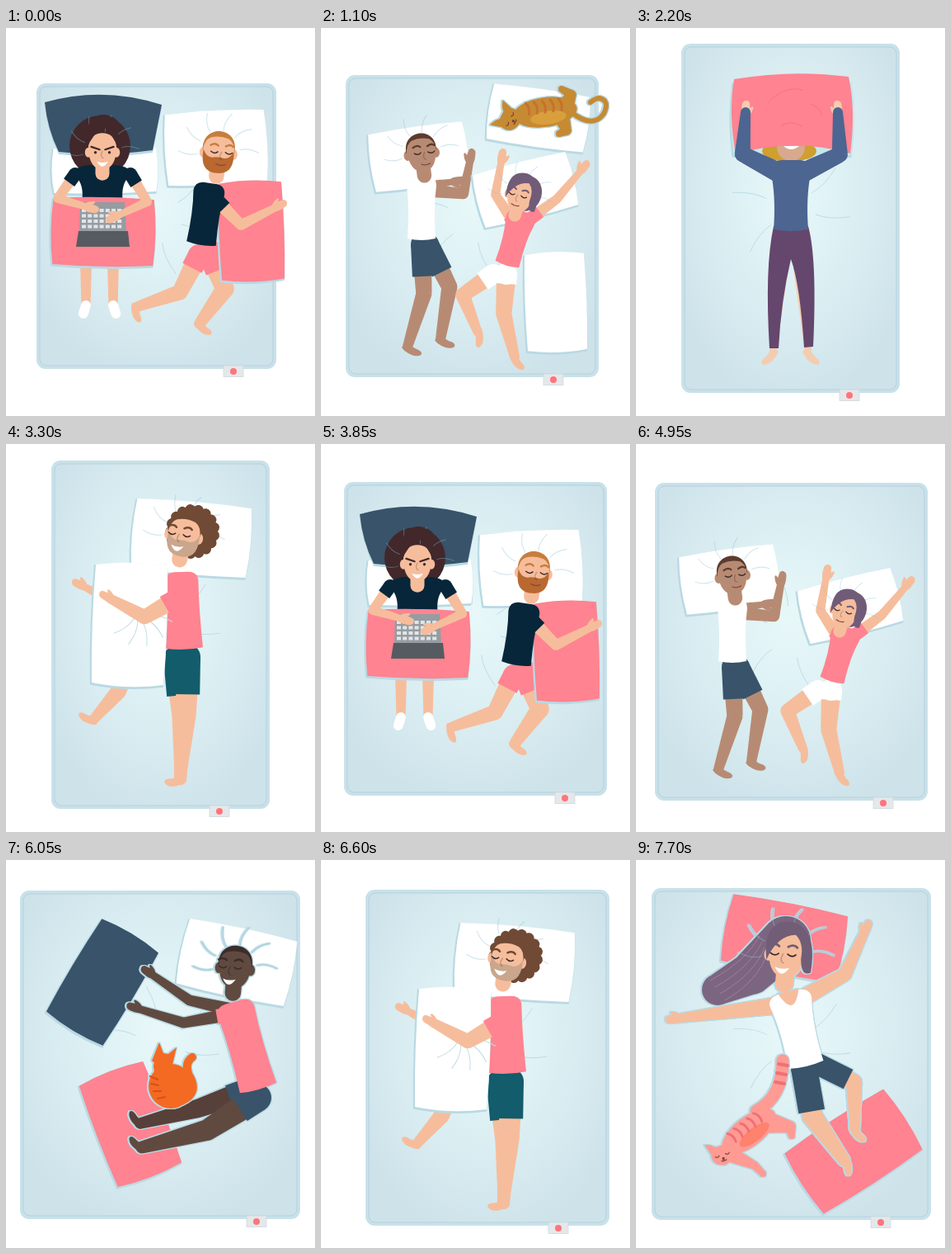
Write an HTML page that moves like this. It is 375 px wide and 470 px high and loops after 8250 ms.

```html
<!DOCTYPE html>
<html lang="en">
<head>
<meta charset="utf-8">
<title>Sleeping habits</title>
<style>
html, body { margin: 0; width: 100%; height: 100%; overflow: hidden; background: #fff; }
svg { display: block; width: 375px; height: 470px; }
.halo { filter: drop-shadow(1.5px 0 #b9d9e3) drop-shadow(-1.5px 0 #b9d9e3) drop-shadow(0 1.5px #b9d9e3) drop-shadow(0 -1px #b9d9e3); }
</style>
</head>
<body>
<svg id="stage" viewBox="0 0 375 470"></svg>
<script>
const PINK = '#ff8390', NAVY = '#38536a', DARK = '#07263a', WHITE = '#fff', SHADE = '#b9d9e3',
      FAIR = '#f6bd9c', PALE = '#f3cdb0', TAN = '#b78b73', BROWN = '#8a6650', DEEP = '#604a40';
const STEP = 550;

// Drawing primitives
const shape = (c, d) => `<path d="${d}" fill="${c}"/>`;
const line = (c, w, d, cap = 'round') => `<path d="${d}" fill="none" stroke="${c}" stroke-width="${w}" stroke-linecap="${cap}" stroke-linejoin="round"/>`;
const disc = (c, x, y, rx, ry = rx) => `<ellipse cx="${x}" cy="${y}" rx="${rx}" ry="${ry}" fill="${c}"/>`;
const put = (x, y, rot, s, body) => `<g transform="translate(${x} ${y}) rotate(${rot}) scale(${s})">${body}</g>`;
const halo = body => `<g class="halo">${body}</g>`;
const repeat = (n, f) => Array.from({ length: n }, (_, i) => f(i)).join('');
const degrees = (dx, dy) => Math.atan2(dy, dx) * 180 / Math.PI;

// Chain of circles joined by tapering bars: x, y, radius for each
function limb(c, ...n) {
  let d = '';
  for (let i = 0; i < n.length; i += 3) {
    const [x, y, r, X, Y, R] = n.slice(i, i + 6);
    d += `M${x - r} ${y}a${r} ${r} 0 0 0 ${2 * r} 0a${r} ${r} 0 0 0 ${-2 * r} 0z`;
    if (R) {
      const l = Math.hypot(X - x, Y - y), u = (y - Y) / l, v = (X - x) / l;
      d += `M${x + u * r} ${y + v * r}L${X + u * R} ${Y + v * R} ${X - u * R} ${Y - v * R} ${x - u * r} ${y - v * r}z`;
    }
  }
  return shape(c, d);
}

// Two-part limb whose middle joint is pushed sideways by bend
function member(tip, skin, x, y, X, Y, bend, { r, turn = 0, cloth, cover = .35, end = skin }) {
  const l = Math.hypot(X - x, Y - y), at = .47,
        jx = x + (X - x) * at - (Y - y) / l * bend, jy = y + (Y - y) * at + (X - x) / l * bend;
  return put(X, Y, degrees(X - jx, Y - jy) + turn, `1 ${(turn || -bend) < 0 ? 1 : -1}`, shape(end, tip)) +
    limb(skin, x, y, r, jx, jy, r * .8, X, Y, r * .4 + 1.2) +
    (cloth ? disc(cloth, x, y, r + 1) + line(cloth, 2 * r + 2, `M${x} ${y}L${x + (jx - x) * cover} ${y + (jy - y) * cover}`, 'butt') : '');
}
const HAND = 'M-4-4Q0-8 6-9Q9-8 5-5L12-4Q15-2 14 1Q13 5 7 5Q0 6-4 4z';
const FOOT = 'M-5-5Q4-2 13-5Q19-6 19-2Q17 3 10 5Q2 7-5 5z';
const arm = (skin, x, y, X, Y, bend, o) => member(HAND, skin, x, y, X, Y, bend, { r: 8, ...o });
const leg = (skin, x, y, X, Y, bend, o) => member(FOOT, skin, x, y, X, Y, bend, { r: 12, ...o });

// Top from neck to waist; a and b are half widths at shoulder and hip
function torso(c, x, y, X, Y, a, b, neck) {
  const l = Math.hypot(X - x, Y - y);
  return put(x, y, degrees(X - x, Y - y) - 90, 1,
    shape(c, `M${-a * .45} 0Q${-a} 1 ${-a} 12Q${-b * .85} ${l / 2} ${-b} ${l}Q0 ${l + 4} ${b} ${l}Q${b * .85} ${l / 2} ${a} 12Q${a} 1 ${a * .45} 0z`) +
    (neck ? shape(neck, `M${-a * .5}-1Q0 ${a * 1.3} ${a * .5}-1z`) : ''));
}

function pillow(c, x, y, w, h, rot) {
  const a = w / 2, b = h / 2, d = `M${-a} ${-b}Q0 ${-b * 1.1} ${a} ${-b}Q${a * 1.08} 0 ${a} ${b}Q0 ${b * 1.1} ${-a} ${b}Q${-a * 1.08} 0 ${-a} ${-b}z`;
  return put(x - 1, y + 1.5, rot, 1, shape(SHADE, d) + line(SHADE, 2.5, d)) + put(x, y, rot, 1, shape(c, d));
}

const CAP = 'M-10.4 0C-13-18 13-18 10.4 0Q10-7 6-9Q0-11-6-9Q-10-7-10.4 0z';
const BOB = 'M-11 4Q-15-18 1-18Q16-16 14 9Q9 12 8 2Q9-7 4-11Q-6-10-11 4z';
const BEARD = 'M-10-1Q-8 4-4 4Q0 3 4 4Q8 4 10-1C11 9 8 14 0 14S-11 9-10-1z';
const GRIN = shape(WHITE, 'M-4 7.5Q0 9 4 7.5Q2 11 0 11T-4 7.5z');
const LIPS = line('#8a4a45', .8, 'M-3 8q3 1.5 6 0');
const ASLEEP = line('#3d2b2b', .8, 'M-7 0q2.5 2 4.5 0M2.5 0q2.5 2 4.5 0');
const AWAKE = disc('#3d2b2b', -5, 1, 1) + disc('#3d2b2b', 5, 1, 1);

function head(x, y, s, rot, skin, hair, { back = '', cut = CAP, beard, mouth = LIPS, eyes = ASLEEP, brows = 'M-7.5-4q3-2 5 0M2.5-4q3-2 5 0', look = 0 } = {}) {
  const crease = repeat(6, i => put(0, 0, i * 36 - 190, 1, line('#8cc3d666', .6, 'M14 0Q20-1 26 3')));
  return put(x, y, rot, s, crease + back + line(skin, 10, 'M0 8V16') + disc(skin, -10, 1, 2.5, 3.5) + disc(skin, 10, 1, 2.5, 3.5) +
    shape(skin, 'M-10-3C-10-16 10-16 10-3C10 8 6 13 0 13S-10 8-10-3z') + (beard ? shape(beard, BEARD) : '') + shape(hair, cut) +
    put(look, 0, 0, 1, line(hair, 1.3, brows) + eyes + line('#0003', .8, 'M0 0q-2 4 .5 5') + mouth));
}

const curls = (c, x, r) => disc(c, x, -3, r) + repeat(17, i => disc(c, x + r * Math.cos(i * .37), -3 + r * Math.sin(i * .37), 3.4));

function bed(x, y, w, h, tag) {
  const frame = (m, r, a) => `<rect x="${x + m}" y="${y + m}" width="${w - 2 * m}" height="${h - 2 * m}" rx="${r}" ${a}/>`;
  const folds = repeat(6, i => put(x + w / 2, y + h * .47, i * 62 + 15, 1, line('#bddce6', .9, 'M32 0Q50 2 72-8')));
  return frame(0, 11, 'fill="#c9e1e9"') + frame(4, 8, 'fill="url(#sheet)" stroke="#b3d2dd"') + folds +
    `<rect x="${tag}" y="${y + h - 4}" width="24" height="13.5" fill="#e4e8ea" stroke="#cfdade" stroke-width=".8"/>` +
    disc('#ff747d', tag + 12, y + h + 3, 4);
}

// Sleepers
function typist() {
  const hair = '#42282a', sleeve = { r: 7, cloth: DARK };
  const shin = x => limb(FAIR, x, 285, 7, x, 338, 5.5) + limb(WHITE, x, 336, 6, x + (x - 113) * .2, 346, 6);
  const keys = repeat(28, i => `M${92 + i % 7 * 7.2} ${219 + (i / 7 | 0) * 6.5}h5v4h-5z`);
  const cover = 'M47 90Q118 70 189 93L178 148Q118 156 64 150Q50 122 47 90z';
  return pillow(WHITE, 120, 172, 124, 54, -1) + put(0, 3, 0, 1, shape(SHADE, cover)) + shape(NAVY, cover) +
    limb(hair, 118, 129, 24, 114, 143, 37) + shin(97) + shin(130) +
    torso(DARK, 117, 166, 117, 212, 34, 25) +
    head(117, 149, 1.7, 0, FAIR, hair, { eyes: AWAKE, brows: 'M-8-3l6 2M8-3l-6 2', mouth: GRIN, cut: 'M-11-2Q-14-24 1-26Q14-24 11-2Q8-11 1-17Q-7-12-11-2z' }) +
    pillow(PINK, 118, 247, 122, 80, 1) +
    shape('#969ca1', 'M90 211H144L146 247H89z') + shape('#e0e6e8', keys) + shape('#555b61', 'M88 246H148L150 265H85z') +
    arm(FAIR, 84, 177, 99, 217, 30, sleeve) + arm(FAIR, 151, 177, 134, 228, -30, sleeve);
}

const hugger = () => pillow(WHITE, 255, 145, 120, 86, -3) +
  leg(FAIR, 234, 275, 158, 338, -20, { turn: -75, cloth: PINK }) +
  leg(FAIR, 248, 272, 235, 358, -24, { turn: -75, cloth: PINK, cover: .5, r: 14 }) +
  pillow(PINK, 298, 246, 76, 117, -2) + torso(DARK, 248, 188, 237, 261, 19, 18) +
  arm(FAIR, 254, 207, 328, 217, 27, { cloth: DARK }) +
  head(258, 150, 1.85, 5, FAIR, '#c77d3d', { beard: '#b9692f', look: 2 });

const napper = () => pillow(WHITE, 119, 156, 115, 70, -8) +
  arm(TAN, 128, 191, 162, 186, 0, { r: 6 }) +
  leg(TAN, 122, 262, 105, 386, -11, { turn: -70, cloth: NAVY, cover: .65 }) +
  leg(TAN, 130, 262, 145, 377, -19, { turn: -65, cloth: NAVY, cover: .65 }) +
  arm(TAN, 134, 197, 181, 160, 27) + torso(WHITE, 122, 179, 122, 255, 18, 17) +
  head(122, 151, 1.75, -7, TAN, '#5d3b2d', { look: 2 });

const stretcher = () => pillow(WHITE, 248, 196, 116, 66, -14) +
  arm(FAIR, 233, 234, 219, 160, -15, { r: 7, cloth: PINK, cover: .2 }) +
  arm(FAIR, 254, 231, 316, 172, 5, { r: 7, cloth: PINK }) +
  leg(FAIR, 209, 298, 190, 368, 29, { turn: 10, r: 11, cloth: WHITE }) +
  leg(FAIR, 225, 298, 235, 398, 8, { turn: -12, cloth: WHITE, cover: .25 }) +
  torso(PINK, 245, 222, 226, 286, 18, 15) +
  head(242, 203, 1.55, 16, FAIR, '#715c78', { cut: BOB, look: -2, back: disc('#715c78', 4, -3, 12, 14) });

const hider = () => pillow('#c4e8ee', 190, 110, 143, 88, 0) +
  disc('#cf9f30', 186, 149, 33, 13) + disc('#d8a98d', 188, 145, 17, 16) + shape(WHITE, 'M179 143Q188 151 198 143z') +
  leg(PALE, 178, 290, 166, 393, 0, { turn: 28, r: 7 }) + leg(PALE, 198, 290, 209, 393, 0, { turn: -28, r: 7 }) +
  shape('#65466d', 'M167 240H209Q220 280 215 386L204 387Q199 310 188 280Q176 330 173 388L162 388Q156 290 167 240z') +
  shape(PINK, 'M119 62Q190 50 258 59Q267 100 260 152Q190 132 121 153Q112 105 119 62z') +
  line('#f07585', 1, 'M160 91q20-22 42-16m10 17q10 3 14 13M176 119q12-9 25 0') +
  [-1, 1].map(k => arm('#4d6591', 188 + 17 * k, 174, 189 + 56 * k, 102, 27 * k, { r: 12, end: PALE })).join('') +
  torso('#4d6591', 188, 160, 188, 244, 25, 21);

const curly = () => pillow(WHITE, 225, 114, 139, 84, 5) +
  leg(FAIR, 150, 262, 106, 334, -8, { turn: 62 }) + arm(FAIR, 125, 188, 93, 172, 0, { r: 7 }) +
  leg(FAIR, 207, 260, 212, 406, -4, { turn: 65, r: 15, cloth: '#125c6b', cover: .65 }) +
  leg(FAIR, 220, 258, 211, 406, -3, { turn: 65, r: 15, cloth: '#125c6b', cover: .65 }) +
  torso(PINK, 213, 155, 216, 247, 20, 23) + pillow(WHITE, 150, 219, 87, 143, 2) +
  repeat(6, i => put(163, 205, i * 32 - 20, 1, line('#bfdce6', 1, 'M10 0Q24-4 40 2'))) +
  arm(FAIR, 206, 188, 126, 187, -22, { r: 11, cloth: PINK }) +
  head(216, 110, 1.9, 10, FAIR, '#704a34', { back: curls('#704a34', 5, 14), beard: '#c9a68c', mouth: GRIN, look: -3 });

const sider = () => pillow(PINK, 90, 118, 78, 117, -8) +
  line(PINK, 43, 'M195 118H221', 'butt') +
  arm(FAIR, 137, 106, 204, 83, -11, { r: 7 }) + arm(FAIR, 137, 130, 204, 152, 11, { r: 7 }) +
  torso(FAIR, 118, 118, 160, 118, 18, 16) + torso(NAVY, 123, 118, 199, 118, 19, 19, FAIR) +
  head(97, 114, 1.7, -92, FAIR, '#5b1c20', { back: limb('#5b1c20', 0, -7, 16, -9, 5, 7) });

const soldier = () => pillow(WHITE, 280, 120, 115, 75, -3) +
  [270, 293].map(x => leg(DEEP, x, 247, x + 2, 330, 0, { cloth: '#dcdfe1', cover: 1 })).join('') +
  arm(DEEP, 301, 173, 319, 256, -12) + torso(WHITE, 282, 161, 281, 239, 22, 22, DEEP) +
  arm(DEEP, 265, 174, 278, 212, 38, { r: 7 }) +
  head(285, 124, 1.9, 0, DEEP, '#41342f');

const crossed = () => pillow(PINK, 286, 361, 80, 117, 6) +
  leg(BROWN, 172, 369, 78, 380, 0, { turn: 8, r: 11 }) + limb(BROWN, 194, 361, 16, 180, 361, 16) +
  line(WHITE, 46, 'M156 361Q172 358 189 361', 'butt') +
  torso(NAVY, 254, 361, 192, 361, 17, 18, BROWN) +
  arm(BROWN, 248, 350, 212, 364, 38, { r: 6 }) + arm(BROWN, 248, 374, 212, 366, -34, { r: 6 }) +
  head(286, 360, 1.85, 88, BROWN, '#30211f', { back: curls('#30211f', 0, 15) });

const upended = () => [-1, 1].map(k => leg(FAIR, 104 + 13 * k, 232, 104 + 15 * k, 150, 0, { r: 10, cloth: DARK, cover: .75 }) +
    arm(FAIR, 104 + 20 * k, 285, 104 + 40 * k, 203, 15 * k, { cloth: NAVY })).join('') +
  pillow(WHITE, 105, 336, 121, 70, -3) + torso(NAVY, 104, 303, 104, 233, 27, 22) +
  head(105, 336, 1.95, 180, FAIR, '#444b66', { beard: '#dcb498' });

const reacher = () => pillow(NAVY, 117, 148, 80, 131, 31) + pillow(WHITE, 280, 124, 133, 80, 12) + pillow(PINK, 151, 320, 83, 131, -21) + halo(
  arm(DEEP, 272, 181, 176, 138, -10) +
  leg('#574039', 292, 280, 163, 319, -3, { turn: 55, r: 14, cloth: NAVY }) +
  leg(DEEP, 305, 288, 165, 348, -12, { turn: 45, r: 16, cloth: NAVY }) +
  arm(DEEP, 266, 188, 160, 180, -13, { cloth: PINK, cover: .2 }) + torso(PINK, 276, 172, 306, 276, 23, 23) +
  head(278, 130, 1.95, 5, DEEP, '#3b2d2a', { mouth: GRIN, look: -3 }));

const starfish = () => pillow(PINK, 180, 95, 141, 82, 11) + pillow(PINK, 264, 353, 143, 87, -33) + halo(
  arm(FAIR, 166, 177, 50, 192, 0, { r: 10 }) + arm(FAIR, 208, 164, 278, 86, 17, { r: 10 }) +
  leg(FAIR, 218, 246, 266, 326, -28, { turn: -30, cloth: NAVY, cover: .85 }) +
  leg(FAIR, 204, 252, 253, 364, 14, { turn: 10, r: 15, cloth: NAVY, cover: .9 }) +
  limb('#7c6581', 182, 98, 30, 140, 137, 26, 99, 157, 19) +
  repeat(4, i => line('#b08295', .8, `M${150 + i * 3} ${92 + i * 7}Q${134 + i * 5} ${122 + i * 8} ${90 + i * 6} ${146 + i * 8}`)) +
  torso(WHITE, 185, 160, 206, 248, 26, 22, FAIR) +
  head(183, 114, 2.2, 5, FAIR, '#725d77', { cut: BOB, mouth: GRIN, look: -2 }));

// Cats
const catFace = c => shape(c, 'M-13-5L-17-19Q-9-17-5-12L5-12Q9-17 17-19L13-5Q16 9 0 12Q-16 9-13-5z') +
  line('#7b4238', 1.2, 'M-9-1q3 3 5 0M4-1q3 3 5 0M-3 6q1.5 2 3 0q1.5 2 3 0') + disc('#7b4238', 0, 4, 1.7);

const cat = (c, dark, belly, x, y, rot, faceRot, behind) => halo(behind + put(x, y, rot, 1,
  disc(c, 0, 0, 39, 18) + disc(belly, 3, 7, 22, 8) +
  repeat(5, i => line(dark, 3, `M${i * 10 - 22}-14q5 6 2 14`)) + put(-43, 3, faceRot, 1, catFace(c))));

const brownCat = () => pillow(WHITE, 264, 109, 118, 67, 8) + cat('#c68a33', '#c9702f', '#d99f3c', 272, 102, -8, -55,
  line('#c68a33', 6, 'M305 103Q330 122 343 104Q351 88 338 85Q333 85 327 90') +
  limb('#c68a33', 298, 92, 10, 304, 81, 6, 292, 74, 4) + limb('#c68a33', 292, 108, 10, 298, 124, 6, 289, 128, 4));

const pinkCat = () => cat('#ff9b93', '#ef7077', '#ff826e', 137, 329, -38, 20,
  line('#ff9b93', 15, 'M146 304Q178 287 178 243') + repeat(3, i => line('#ef7077', 4, `M${173 - i * 2} ${247 + i * 11}l11 2`)) +
  limb('#ff9b93', 155, 317, 14, 187, 323, 7, 189, 334, 4) + limb('#ff9b93', 118, 358, 9, 144, 370, 5, 154, 380, 4));

const orangeCat = () => halo(line('#f46a23', 10, 'M213 292Q235 282 222 261Q216 246 226 239') +
  limb('#f46a23', 190, 250, 11, 200, 274, 27) + shape('#f46a23', 'M177 243L186 221 191 234 197 235 207 227 202 248Q190 257 177 243z') +
  repeat(4, i => line('#d4501b', 2, `M${175 + i * i} ${262 + i * 9}l9 ${4 - i * 2}`)));

const move = (x, y, f) => put(x, y, 0, 1, f());
const scenes = [
  bed(37, 67, 291, 346, 264) + typist() + hugger(),
  bed(25, 49, 335, 364, 290) + move(-4, -12, napper) + move(22, -5, hugger),
  bed(30, 57, 307, 366, 270) + napper() + brownCat() + stretcher() + pillow(WHITE, 285, 332, 72, 116, -2),
  bed(22, 50, 329, 372, 284) + move(-10, 0, typist) + move(12, -10, stretcher),
  bed(55, 19, 265, 423, 247) + hider(),
  bed(55, 20, 265, 422, 247) + move(-60, 0, stretcher),
  bed(55, 20, 265, 422, 247) + curly(),
  bed(28, 46, 319, 380, 284) + move(0, -5, typist) + move(0, 5, hugger),
  bed(28, 49, 321, 375, 287) + soldier() + crossed() + upended() + sider(),
  bed(23, 47, 331, 385, 288) + move(-5, 8, napper) + move(12, 0, stretcher),
  bed(22, 40, 330, 390, 286) + move(-5, 0, typist) + move(8, 0, hugger),
  bed(17, 37, 340, 398, 292) + reacher() + orangeCat(),
  bed(54, 36, 296, 407, 276) + move(10, 10, curly),
  bed(54, 27, 296, 408, 276) + move(14, 12, hider),
  bed(19, 34, 339, 402, 285) + starfish() + pinkCat()
];

const stage = document.getElementById('stage');
stage.innerHTML = `<defs><radialGradient id="sheet" cx=".5" cy=".43" r=".62"><stop stop-color="#e8f8f9"/><stop offset=".5" stop-color="#dbeff3"/><stop offset="1" stop-color="#cee2ea"/></radialGradient></defs>` +
  scenes.map(s => `<g display="none">${s}</g>`).join('');
const groups = [...stage.children].slice(1);
let shown = -1;

function tick() {
  const i = Math.floor(performance.now() / STEP) % groups.length;
  if (i != shown) {
    groups.forEach((g, k) => g.setAttribute('display', k == i ? 'inline' : 'none'));
    shown = i;
  }
  requestAnimationFrame(tick);
}
tick();
</script>
</body>
</html>
```
